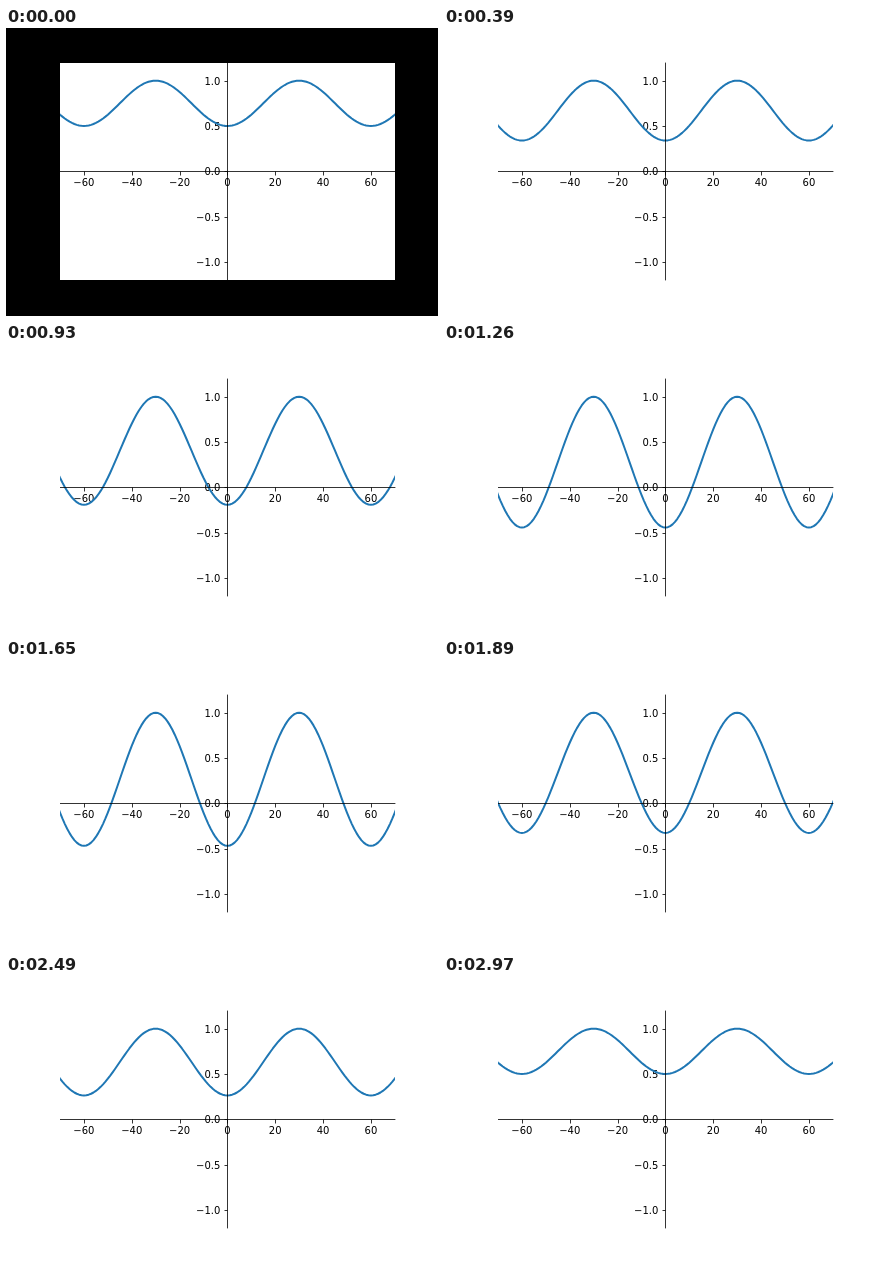
An HTML page that plays this animation: 432 px wide and 288 px high, repeating every 3 s.

```html
<!DOCTYPE html>
<html lang="en">
<head>
<meta charset="utf-8">
<title>Oscillating wave</title>
<style>
  html, body { margin: 0; width: 100%; height: 100%; overflow: hidden; background: #fff; }
  svg { display: block; width: 432px; height: 288px; }
  text { font: 10px "DejaVu Sans", sans-serif; fill: #000; }
  .axis { stroke: #000; stroke-width: 0.8; fill: none; }
  #curve { stroke: #1f77b4; stroke-width: 2; stroke-linejoin: round; fill: none; }
</style>
</head>
<body>
<svg viewBox="0 0 432 288">
  <clipPath id="plot"><rect x="54" y="35" width="335" height="217"/></clipPath>
  <rect id="back" width="432" height="288"/>
  <rect x="54" y="35" width="335" height="217" fill="#fff"/>
  <g id="ticks"></g>
  <path id="curve" clip-path="url(#plot)"/>
  <path class="axis" d="M54 143.5H389.4M221.5 34.6V252.4"/>
</svg>
<script>
const FRAME_MS = 30, FRAMES = 100;
const px = x => 221.4 + x * 334.8 / 140;
const py = y => 143.28 - y * 90.6;
const byId = id => document.getElementById(id);
const back = byId('back'), curve = byId('curve'), ticks = byId('ticks');

function add(tag, attrs, label = '') {
  const el = document.createElementNS('http://www.w3.org/2000/svg', tag);
  for (const key in attrs) el.setAttribute(key, attrs[key]);
  el.textContent = label;
  ticks.append(el);
}

const minus = s => String(s).replace('-', '\u2212');

for (let x = -60; x <= 60; x += 20) {
  add('path', { class: 'axis', d: `M${Math.round(px(x)) + 0.5} 143.5v4` });
  add('text', { x: px(x), y: 158, 'text-anchor': 'middle' }, minus(x));
}
for (let y = -1; y <= 1; y += 0.5) {
  add('path', { class: 'axis', d: `M221.5 ${Math.round(py(y)) + 0.5}h-3` });
  add('text', { x: 214.4, y: Math.round(py(y) + 4), 'text-anchor': 'end' }, minus(y.toFixed(1)));
}

// The crests stay at 1 while the troughs swing between 0.5 and -0.5.
function draw(frame) {
  const low = 0.5 * Math.cos(2 * Math.PI * frame / (FRAMES - 1));
  const points = [];
  for (let x = -71; x <= 71; x++) {
    const y = (1 + low) / 2 - (1 - low) / 2 * Math.cos(Math.PI * x / 30);
    points.push(px(x).toFixed(2) + ' ' + py(y).toFixed(2));
  }
  curve.setAttribute('d', 'M' + points.join('L'));
  back.setAttribute('fill', frame === 0 ? '#000' : '#fff');
}

const start = performance.now();
function tick() {
  draw(Math.floor((performance.now() - start) / FRAME_MS + 1e-6) % FRAMES);
  requestAnimationFrame(tick);
}
tick();
</script>
</body>
</html>
```
